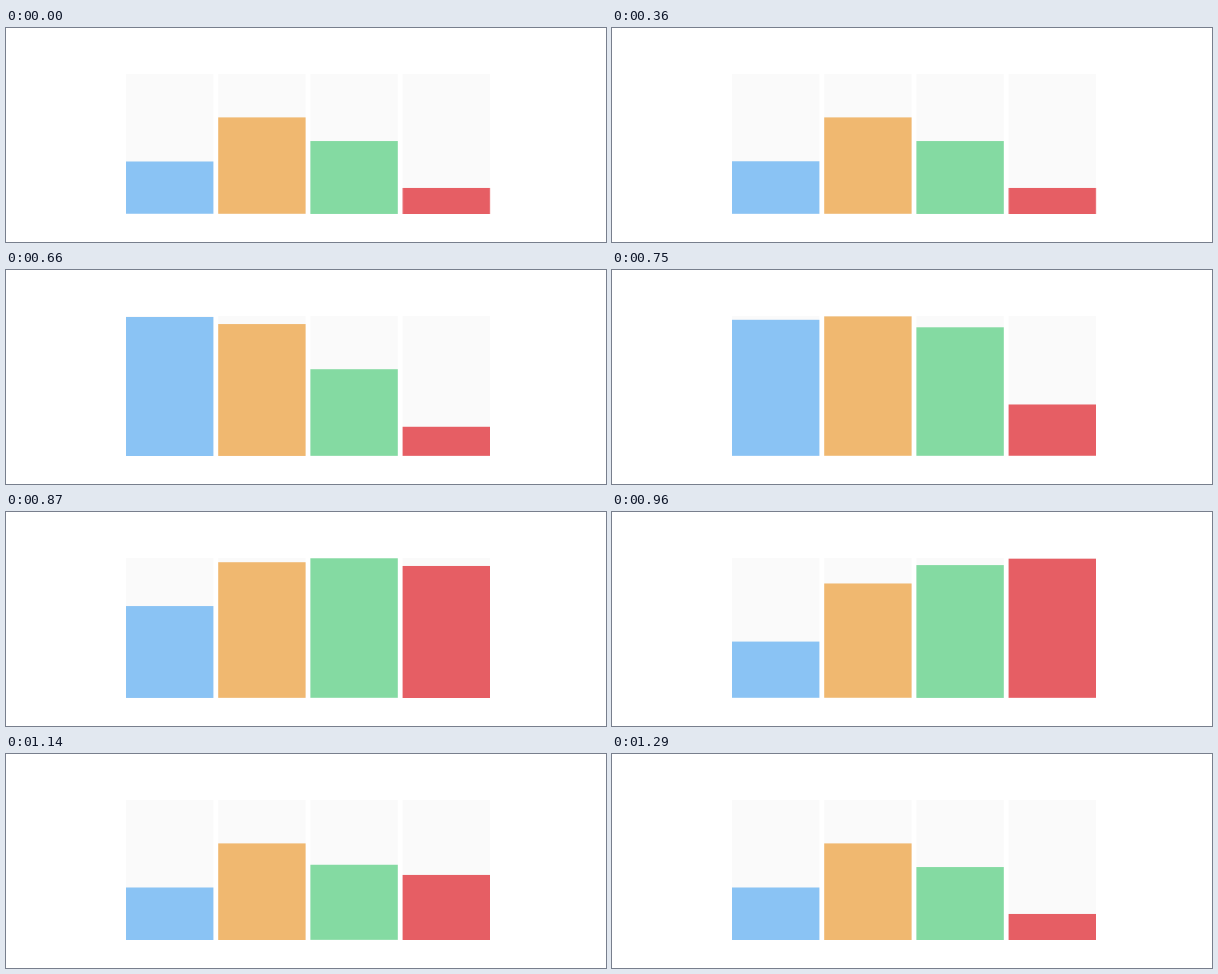
Animation of 600x214 px, one loop 1650 ms. Source, as an HTML page:

```html
<!DOCTYPE html>
<html lang="en">
<head>
<meta charset="utf-8">
<title>Bar wave</title>
<style>
  html, body { margin: 0; width: 100%; height: 100%; overflow: hidden; background: #fff; }
  svg { display: block; width: 600px; height: 214px; }
  rect { width: 87.4px; height: 140px; y: 46px; x: calc(120px + var(--i) * 92.2px); }
  .track { fill: #fafafa; }
  .bar {
    fill: var(--color);
    transform-box: fill-box;
    transform-origin: 50% 100%;
    animation: wave 666ms cubic-bezier(.76, .07, .35, .94) both paused;
    animation-delay: calc(352ms + var(--i) * 86ms - var(--t, 0ms));
  }
  @keyframes wave {
    0%, 100% { transform: scaleY(var(--low)); }
    50% { transform: scaleY(1); }
  }
</style>
</head>
<body>
<svg viewBox="0 0 600 214">
  <g style="--i: 0; --low: .375; --color: #8ac3f4"><rect class="track"/><rect class="bar"/></g>
  <g style="--i: 1; --low: .69; --color: #f0b870"><rect class="track"/><rect class="bar"/></g>
  <g style="--i: 2; --low: .521; --color: #84daa2"><rect class="track"/><rect class="bar"/></g>
  <g style="--i: 3; --low: .186; --color: #e65e64"><rect class="track"/><rect class="bar"/></g>
</svg>
<script>
  const LOOP = 1650, STEP = 30;

  // Seek the paused CSS animations, advancing once per 30 ms step.
  function seek() {
    const time = performance.now() % LOOP;
    const t = Math.floor(time / STEP) * STEP;
    document.documentElement.style.setProperty('--t', t + 'ms');
    requestAnimationFrame(seek);
  }
  seek();
</script>
</body>
</html>
```
